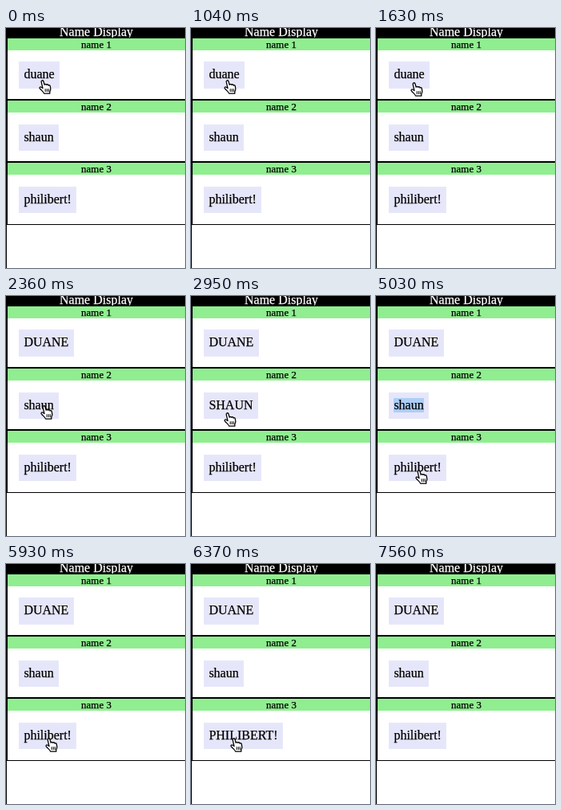
An HTML page that plays this animation: 224 by 301 pixels, repeating every 8010 ms.

```html
<!DOCTYPE html>
<html lang="en">
<head>
<meta charset="utf-8">
<title>Name Display</title>
<style>
  html, body { margin: 0; width: 100%; height: 100%; overflow: hidden; background: #fff; }
  body {
    position: relative; box-sizing: border-box; border-left: 1px solid #000;
    font: 16px/18px "Liberation Serif", Times, serif;
    -webkit-text-stroke: .25px currentColor;
  }
  h1 {
    margin: 0; height: 12px; overflow: hidden; background: #000; color: #fff;
    font: inherit; text-align: center; text-indent: 1px;
  }
  h1 span { position: relative; top: -4px; }
  section {
    position: absolute; left: 0; right: 0; top: calc(11.6px + 78.4px * var(--i)); height: 78.4px;
    box-sizing: border-box; border: 1px solid #000; border-right: 0; background: #fff;
  }
  h2 { margin: 0; background: lightgreen; font: 13px/15px "Liberation Serif", Times, serif; text-align: center; }
  .box { position: absolute; left: 14px; top: 29.8px; padding: 7px 6.4px 8.2px; background: lavender; }
  .box span { display: block; }
  .selected { background: #accef7; }
  #hand { position: absolute; left: -1px; top: 0; overflow: visible; }
</style>
</head>
<body>
<h1><span>Name Display</span></h1>
<svg id="hand" width="16" height="18" stroke="#000" stroke-linecap="round" stroke-linejoin="round">
  <path fill="#fff" stroke-width="1.3" d="M3.2 2.6C2.8.7 5.1.1 5.9 1.8L7.2 6.2C7.6 5 9.1 5 9.6 6.4 10.1 5.3 11.6 5.5 12 7 12.8 6.1 14 6.6 14.3 8L14.8 11C15 13 14 14 13.8 15V17.2H6.6C6 15 3.5 13.5 1.3 10.8.4 9.4 1.9 8.3 3.1 9.2L5 10.6Z"/>
  <path fill="none" d="M8.2 11.6v3M10.3 11.6v3M12.3 11.6v3"/>
</svg>
<script>
const LOOP = 8010, TICK = 145;
const hand = document.getElementById("hand");

// Each click toggles the case; the word is selected during [from, to).
const rows = [
  { word: "duane", clicks: [600, 1040, 1780], selected: [0, 0] },
  { word: "shaun", clicks: [2950, 3550, 4000, 4290], selected: [4290, 5180] },
  { word: "philibert!", clicks: [5330, 5930, 6370, 6970], selected: [6230, 6370] }
];

// Pointer moves between resting points; bow is the sideways swing of the path.
const home = { x: 41, y: 65 };
const moves = [
  { start: 1340, end: 2800, x: 41, y: 146, bow: 3 },
  { start: 4290, end: 5030, x: 49, y: 218, bow: 0 },
  { start: 6970, end: 7560, x: 196, y: 304, bow: 0 }
];

const ease = u => u < 0.5 ? 4 * u ** 3 : 1 - 4 * (1 - u) ** 3;

rows.forEach((row, i) => {
  const section = document.createElement("section");
  section.style.setProperty("--i", i);
  section.innerHTML = `<h2>name ${i + 1}</h2><div class="box"><span></span></div>`;
  row.text = section.querySelector("span");
  hand.before(section);
});

function pointerAt(t) {
  let { x, y } = home;
  for (const { start, end, x: toX, y: toY, bow } of moves) {
    if (t < start) break;
    // The pointer is seen in steps of one tick.
    const seen = Math.floor((t - start) / TICK) * TICK;
    const u = t >= end ? 1 : seen / (end - start);
    x += (toX - x) * ease(u) + bow * Math.sin(Math.PI * u);
    y += (toY - y) * ease(u);
  }
  return [Math.round(x), Math.round(y)];
}

function draw(now) {
  const t = now % LOOP;
  for (const { word, clicks, selected: [from, to], text } of rows) {
    const upper = clicks.filter(click => click <= t).length % 2;
    text.textContent = upper ? word.toUpperCase() : word;
    text.className = t >= from && t < to ? "selected" : "";
  }
  const [x, y] = pointerAt(t);
  hand.style.transform = `translate(${x}px, ${y}px)`;
  requestAnimationFrame(draw);
}
draw(0);
</script>
</body>
</html>
```
